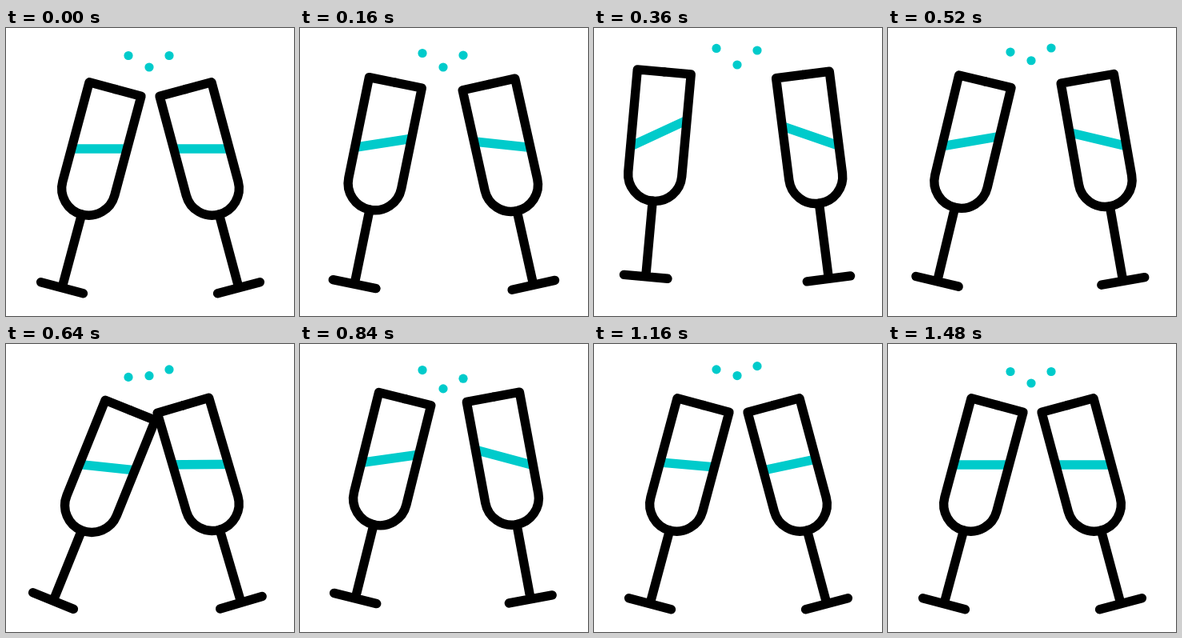
Recreate the animation shown at these times as an HTML page. Size 360 by 360 pixels, loop 2040 ms.

```html
<!DOCTYPE html>
<html lang="en">
<head>
<meta charset="utf-8">
<title>Clinking glasses</title>
<style>
  html, body { margin: 0; height: 100%; overflow: hidden; background: #fff; }
  svg { display: block; width: 100%; height: 100%; }
  .glass { fill: none; stroke: #000; stroke-width: 11.4; stroke-linecap: round; stroke-linejoin: round; }
  .drink { stroke: #00cbcb; stroke-width: 11.5; }
  .bubble { fill: #00cbcb; }
</style>
</head>
<body>
<svg viewBox="0 0 360 360">
  <defs>
    <path id="bowl" d="M-33.6-162H33.6V-33.6A33.6 33.6 0 0 1-33.6-33.6Z"/>
    <clipPath id="inside"><use href="#bowl"/></clipPath>
  </defs>
  <g id="stage"></g>
</svg>
<script>
const LOOP = 2040, STEP = 40;
const stage = document.getElementById('stage');

// Each glass pivots where the bowl meets the stem; the right one is mirrored.
const glasses = [
  {
    mirror: '',
    times: [0, 400, 640, 880, 1160, 1480],
    x: [0, -21.9, 0, -2.7, 0, 0],
    y: [0, -17.2, 0, -7.7, 0, 0],
    tilt: [0, -10.1, 7, -1.6, 0, 0],
    slosh: [0, -15.4, -1, -7.4, 5, 0]
  },
  {
    mirror: 'translate(361 0) scale(-1 1) ',
    times: [0, 440, 640, 880, 1160, 1480],
    x: [0, -16.3, -0.7, -4.8, 0, 0],
    y: [0, -15, -0.9, -7.9, 0, 0],
    tilt: [0, -8.4, 1.4, -4.9, 0, 0],
    slosh: [0, -12.3, -0.9, -11.2, 12, 0]
  }
];

const bubbles = [
  { x: 153, y: 34.5, delay: 0 },
  { x: 179, y: 49, delay: 200 },
  { x: 204, y: 34.5, delay: 100 }
];
const bobTimes = [0, 420, 710, 940, 1280];
const bob = [0, -9.5, 9.5, -9.5, 0];

// Sine-eased interpolation between keyframes.
function tween(times, values, t) {
  if (t <= 0) return values[0];
  const i = times.findIndex(k => k > t);
  if (i < 0) return values[values.length - 1];
  const p = (t - times[i - 1]) / (times[i] - times[i - 1]);
  return values[i - 1] + (values[i] - values[i - 1]) * (1 - Math.cos(Math.PI * p)) / 2;
}

function add(tag, attrs, html = '') {
  const el = document.createElementNS('http://www.w3.org/2000/svg', tag);
  for (const name in attrs) el.setAttribute(name, attrs[name]);
  el.innerHTML = html;
  return stage.appendChild(el);
}

for (const g of glasses) {
  g.el = add('g', { class: 'glass' },
    `<g clip-path="url(#inside)"><path class="drink" d="M-60 0H60"/></g>
     <use href="#bowl"/><path d="M0-162V-162M0 0V95M-27.4 95H27.4"/>`);
  g.drink = g.el.querySelector('.drink');
}
for (const b of bubbles) b.el = add('circle', { class: 'bubble', cx: b.x, r: 5.6 });

function draw(now) {
  const t = Math.floor(now % LOOP / STEP) * STEP;
  for (const g of glasses) {
    const at = key => tween(g.times, g[key], t);
    g.el.setAttribute('transform',
      `${g.mirror}translate(${94.6 + at('x')} ${233 + at('y')}) rotate(${15 + at('tilt')})`);
    g.drink.setAttribute('transform', `translate(0 -85) rotate(${at('slosh') - 15})`);
  }
  for (const b of bubbles) b.el.setAttribute('cy', b.y + tween(bobTimes, bob, t - b.delay));
}

const start = performance.now();
function frame() {
  draw(performance.now() - start);
  requestAnimationFrame(frame);
}
frame();
</script>
</body>
</html>
```
